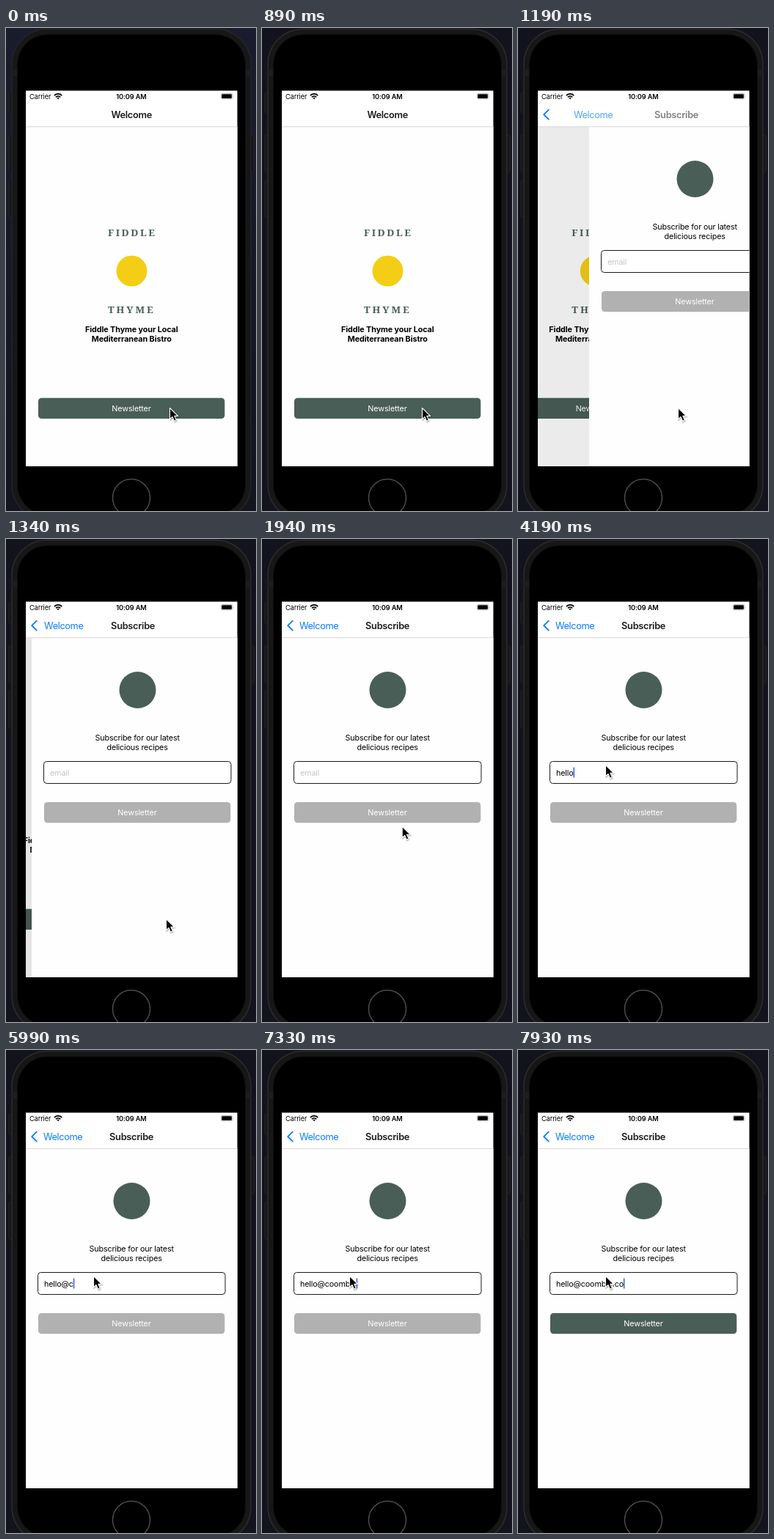
Animation, 341 px wide and 659 px high, one loop 8000 ms. Source, as an HTML page:

```html
<!DOCTYPE html>
<html lang="en">
<head>
<meta charset="utf-8">
<title>Newsletter sign-up</title>
<style>
  html, body { margin: 0; width: 100%; height: 100%; overflow: hidden; background: #12131d; }
  svg { display: block; width: 100%; height: 100%; }
  text { font: 400 10.8px Inter, "Open Sans", sans-serif; letter-spacing: -.17px; white-space: pre; }
  .mid { text-anchor: middle; }
  .bold { font-weight: 700; letter-spacing: -.1px; }
  .nav { font-size: 12.8px; letter-spacing: -.4px; }
  .title { font-weight: 600; letter-spacing: -.3px; fill: #1c1c1e; }
  .status { font-size: 9.2px; letter-spacing: -.1px; }
  .mark { font: 700 13.3px "Noto Serif", serif; fill: #495e57; }
</style>
</head>
<body>
<svg viewBox="0 0 341 659" xmlns="http://www.w3.org/2000/svg">
  <defs>
    <linearGradient id="desk" x2="0" y2="1">
      <stop stop-color="#1a1c2d"/>
      <stop offset="1" stop-color="#12141f"/>
    </linearGradient>
    <clipPath id="view"><rect x="27" y="135" width="288.5" height="463"/></clipPath>
    <clipPath id="bar"><rect x="27" y="85.5" width="288.5" height="49.5"/></clipPath>
  </defs>

  <rect id="wall" width="341" height="659"/>

  <!-- phone -->
  <g fill="#161616" stroke="#2b2b2b" stroke-width=".8">
    <rect x="4" y="88" width="6" height="27" rx="1.5"/>
    <rect x="4" y="146" width="6" height="50" rx="1.5"/>
    <rect x="4" y="208" width="6" height="50" rx="1.5"/>
    <rect x="332" y="146" width="6" height="50" rx="1.5"/>
  </g>
  <rect id="edge" x="8" y="1.5" width="326" height="670" rx="48" fill="#171717" stroke-width="1.6"/>
  <path d="M8 57h7v9H8zM327 57h7v9h-7z" fill="#1e1e1e"/>
  <rect x="15.5" y="9" width="311" height="655" rx="41" fill="#000" stroke="#0d0d0d"/>
  <circle cx="171" cy="641" r="25.5" fill="#000" stroke="#4c4c4c" stroke-width="1.5"/>
  <rect x="27" y="85.5" width="288.5" height="512.5" fill="#fff"/>

  <!-- pages -->
  <g clip-path="url(#view)">
    <g id="home">
      <rect x="27" y="135" width="289" height="464" fill="#fefefe"/>
      <text class="mark" x="139" y="284" style="letter-spacing:2.5px">FIDDLE</text>
      <circle cx="171.5" cy="331.5" r="21" fill="#f4ce14"/>
      <text class="mark" x="139" y="389" style="letter-spacing:2.9px">THYME</text>
      <text class="mid bold" x="171.3" y="415">Fiddle Thyme your Local</text>
      <text class="mid bold" x="171.3" y="428">Mediterranean Bistro</text>
      <rect x="44" y="504.7" width="254.3" height="28.3" rx="4.5" fill="#495e57"/>
      <text class="mid" x="171" y="523" fill="#fff">Newsletter</text>
    </g>
    <rect id="shade" x="27" y="135" width="289" height="464"/>
    <g id="form">
      <rect x="27" y="135" width="289" height="464" fill="#fefefe"/>
      <circle cx="171.5" cy="206" r="25" fill="#495e57"/>
      <text class="mid" x="171.2" y="274.5">Subscribe for our latest</text>
      <text class="mid" x="171.2" y="287.5">delicious recipes</text>
      <rect x="43.5" y="303.5" width="255.5" height="30" rx="4" fill="#fff" stroke="#1a1a1a"/>
      <text id="field" x="52" y="323"></text>
      <rect id="caret" y="311.5" width="1.5" height="14" fill="#3a5be0"/>
      <rect id="send" x="44" y="359" width="254.3" height="28.3" rx="4.5"/>
      <text class="mid" x="171" y="377" fill="#fff">Newsletter</text>
    </g>
  </g>

  <!-- status and navigation bars -->
  <rect x="27" y="134.2" width="288.5" height="1" fill="#d6d6d8"/>
  <text class="status" x="32" y="97">Carrier</text>
  <g fill="none" stroke="#000" stroke-width="1.7">
    <path d="M65.9 92.1a7.4 7.4 0 0 1 10.4 0M68 94.4a4.5 4.5 0 0 1 6.2 0"/>
    <path d="M71.1 97.2l-1.6-1.6a2.3 2.3 0 0 1 3.2 0z" fill="#000" stroke="none"/>
  </g>
  <text class="status mid" x="171" y="97" style="font-weight:600">10:09 AM</text>
  <rect x="293.3" y="89.3" width="15.6" height="7.6" rx="2" fill="none" stroke="#9a9a9a" stroke-width=".7"/>
  <rect x="294.3" y="90.3" width="13.6" height="5.6" rx="1.2"/>
  <path d="M309.9 91.8q1.1 1.3 0 2.6z" fill="#9a9a9a"/>
  <g clip-path="url(#bar)">
    <text id="homeTitle" class="nav title mid" x="171.2" y="122.5">Welcome</text>
    <g id="formBar">
      <path d="M41.8 111.6l-6.6 6.5 6.6 6.5" fill="none" stroke="#0a7aff" stroke-width="1.9" stroke-linecap="round" stroke-linejoin="round"/>
      <text id="back" class="nav" y="122.5" fill="#0a7aff">Welcome</text>
      <text id="formTitle" class="nav title mid" y="122.5">Subscribe</text>
    </g>
  </g>

  <g id="pointer">
    <path d="M0 0V15.2L3.5 12L6 17.8L8.8 16.6L6.3 10.9H11Z" transform="translate(.6 1.2)" stroke="#000" stroke-width="2" stroke-linejoin="round" opacity=".22"/>
    <path d="M0 0V15.2L3.5 12L6 17.8L8.8 16.6L6.3 10.9H11Z" stroke="#fff" stroke-width="1.1" stroke-linejoin="round"/>
  </g>
</svg>

<script>
const LOOP = 8000, WIDTH = 289, FOCUS = 600, PUSH = 1190;
const EMAIL = 'hello@coomble.co';
const KEYS = [3140, 3440, 3740, 4040, 4190, 5540, 5990, 6440,
  6590, 6740, 6890, 7030, 7330, 7480, 7780, 7930];
const POINTER = [
  [0, 223.5, 518.5], [150, 223, 518.5], [600, 220, 518.5], [740, 218.5, 518.5],
  [1640, 215, 503], [1790, 203, 440], [1940, 191.2, 392.3], [2090, 166, 357.5],
  [2240, 142, 333], [2390, 124, 313], [2540, 119.5, 308.5]
];
const CARET = [[0, 0], [2690, 1], [5240, .5], [5390, 0], [5540, 1]];

const $ = id => document.getElementById(id);
const set = (id, attrs) => {
  for (const name in attrs) $(id).setAttribute(name, attrs[name]);
};
// Last row whose time has been reached
const hold = (rows, t) => rows.filter(row => row[0] <= t).pop();

// Offset of the incoming page, refreshed every 150 ms while it settles
function slide(t) {
  if (t < PUSH) return WIDTH;
  const step = Math.floor((t - PUSH) / 150);
  return step > 2 ? 0 : 70 * Math.exp(-2.17 * step);
}

function draw(t) {
  const x = slide(t), done = 1 - x / WIDTH, pushed = t >= PUSH;
  const lag = Math.pow(x / 70, 1.43), focused = t >= FOCUS;

  set('wall', { fill: focused ? '#12131d' : 'url(#desk)' });
  set('edge', { stroke: focused ? '#2c2c2c' : '#252525' });
  set('home', { transform: `translate(${-.3 * WIDTH * done})` });
  set('shade', { opacity: .1 * done });
  set('form', { transform: `translate(${x})` });

  set('homeTitle', { opacity: pushed ? 0 : 1 });
  set('formBar', { opacity: pushed ? 1 : 0 });
  set('back', { x: 51 + 25 * lag, opacity: Math.max(0, 1 - .3 * lag) });
  set('formTitle', { x: 171.1 + 45 * lag, opacity: Math.max(0, 1 - .45 * lag) });

  const count = KEYS.filter(k => k <= t).length;
  const field = $('field');
  field.textContent = count ? EMAIL.slice(0, count) : 'email';
  set('field', { fill: count ? '#000' : '#c5c5c8' });
  const end = count ? field.getComputedTextLength() : 0;
  set('caret', { x: 52 + end, opacity: hold(CARET, t)[1] });
  set('send', { fill: count === EMAIL.length ? '#495e57' : '#b1b1b1' });

  const [, px, py] = hold(POINTER, t);
  set('pointer', { transform: `translate(${px} ${py})` });
}

const start = performance.now();
function tick() {
  draw((performance.now() - start) % LOOP);
  requestAnimationFrame(tick);
}
tick();
</script>
</body>
</html>
```
